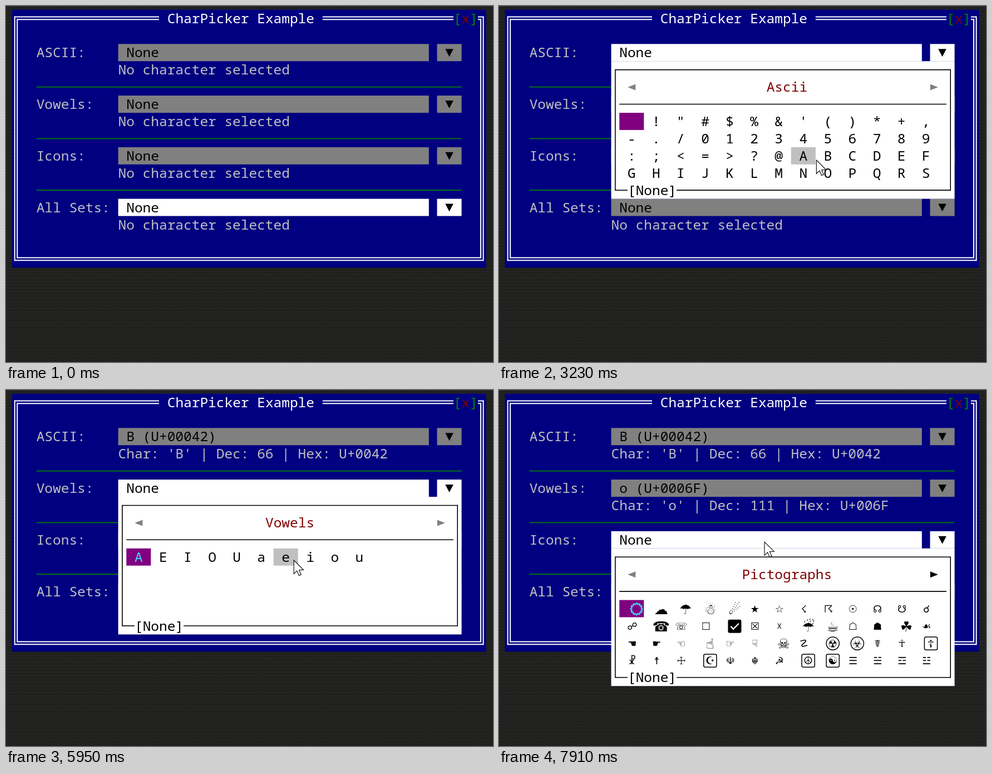
These frames come from a looping animation (875x640 px, 8000 ms). An HTML page with a canvas:

```html
<!DOCTYPE html>
<html lang="en">
<head>
<meta charset="utf-8">
<title>CharPicker Example</title>
<style>
  html, body { margin: 0; width: 100%; height: 100%; overflow: hidden; background: #000; }
  canvas { display: block; width: 875px; height: 640px; }
</style>
</head>
<body>
<canvas id="stage" width="875" height="640"></canvas>
<script>
const W = 875, H = 640, LOOP = 8000;
const CW = 14.69, CH = 30.93, X0 = 10.6, Y0 = 6.4;
const LAG = 70;
const NAVY = '#000080', SILVER = '#c0c0c0', GRAY = '#808080', GREEN = '#008000', MAROON = '#800000';
const MONO = `${CW / 0.6}px "Noto Sans Mono", "DejaVu Sans Mono", monospace`;
const ctx = document.getElementById('stage').getContext('2d');

const range = (start, n) => Array.from({ length: n }, (_, i) => String.fromCharCode(start + i));
const LABELS = ['ASCII:', 'Vowels:', 'Icons:', 'All Sets:'];
const ROWS = [2, 5, 8, 11];
const POPUPS = [
  { title: 'Ascii', col: 32, chars: range(32, 52) },
  { title: 'Vowels', col: 31, chars: [...'AEIOUaeiou'] },
  { title: 'Pictographs', col: 29, chars: range(0x2600, 52), icons: true, more: true }
];
const WIDE = '☀☁☂☃☄☎☑☔☕☘☝☠☢☣☦☪☮☯';
const BOXED = '☦☪☮☯', RINGED = '☢☣';

// Pointer moves: start, end, points evenly spaced in time
const MOVES = [
  [440, 1270, [[817, 690], [812, 500], [775, 280], [690, 110], [590, 35], [515, 48], [471.5, 84]]],
  [2530, 3370, [[471.5, 84], [466, 110], [462, 165], [472, 225], [510, 265], [570, 277], [598, 277]]],
  [3400, 3510, [[598, 277], [607, 271]]],
  [4170, 5010, [[607, 271], [600, 265], [560, 235], [500, 205], [455, 184], [440, 178]]],
  [5560, 6340, [[440, 178], [442, 185], [480, 275], [517, 306], [545, 307], [566, 307], [574, 307]]],
  [6970, 7380, [[574, 307], [560, 300], [510, 280], [477, 273]]]
];
const CLICKS = [[1410, 1540], [2000, 2070], [3710, 3840], [5210, 5410], [6560, 6690], [7780, 7910]];

const colX = c => X0 + c * CW;
const rowY = r => Y0 + r * CH;
const midY = r => rowY(r + 0.5);

function cells(col, row, w, h, color) {
  ctx.fillStyle = color;
  ctx.fillRect(colX(col), rowY(row), w * CW, h * CH);
}

function text(str, col, row, color) {
  ctx.font = MONO;
  ctx.textAlign = 'left';
  ctx.fillStyle = color;
  ctx.fillText(str, colX(col), midY(row) + 8.7);
}

function line(x1, y1, x2, y2, color, width) {
  ctx.strokeStyle = color;
  ctx.lineWidth = width;
  ctx.beginPath();
  ctx.moveTo(x1, y1);
  ctx.lineTo(x2, y2);
  ctx.stroke();
}

function shape(points, color) {
  ctx.fillStyle = color;
  ctx.beginPath();
  points.forEach(([x, y]) => ctx.lineTo(x, y));
  ctx.closePath();
  ctx.fill();
}

function makeBackdrop() {
  const c = document.createElement('canvas');
  c.width = W;
  c.height = H;
  const g = c.getContext('2d');
  g.fillStyle = '#000';
  g.fillRect(0, 0, W, H);
  g.fillStyle = '#8c8c84';
  const dx = CW / 6, dy = CH / 12;
  for (let j = 0; j * dy < H; j++)
    for (let x = (j % 2) * dx / 2; x < W; x += dx) g.fillRect(x, j * dy, 1.25, 1.2);
  return c;
}
const backdrop = makeBackdrop();

function drawWindow() {
  cells(0, 0, 58, 15, NAVY);
  const l = colX(0.5), r = colX(57.5), t = midY(0), b = midY(14);
  for (const d of [-2.3, 2.3]) {
    line(l + d, t + d - 1, l + d, b - d + 1, '#fff', 2);
    line(r - d, t + d - 1, r - d, b - d + 1, '#fff', 2);
    line(l + d, b - d, r - d, b - d, '#fff', 2);
    line(l + d, t + d, colX(18), t + d, '#fff', 2);
    line(colX(38), t + d, colX(54), t + d, '#fff', 2);
    line(colX(57), t + d, r - d, t + d, '#fff', 2);
  }
  text('CharPicker Example', 19, 0, '#fff');
  text('[', 54, 0, GREEN);
  text('x', 55, 0, MAROON);
  text(']', 56, 0, GREEN);
  for (const row of [4, 7, 10]) line(colX(3), midY(row), colX(55), midY(row), GREEN, 1.6);
}

function drawField(i, color, value, info) {
  const row = ROWS[i], x = colX(53.5), y = midY(row);
  text(LABELS[i], 3, row, SILVER);
  cells(13, row, 38, 1, color);
  cells(52, row, 3, 1, color);
  text(value, 14, row, '#000');
  shape([[x - 7.3, y - 6.5], [x + 7.3, y - 6.5], [x, y + 7.5]], '#000');
  text(info, 13, row + 1, SILVER);
}

function drawSun(x, y) {
  ctx.beginPath();
  for (let i = 0; i <= 96; i++) {
    const a = i / 96 * Math.PI * 2, r = 9.6 + 1.1 * Math.cos(a * 12);
    ctx.lineTo(x + r * Math.cos(a), y + r * Math.sin(a));
  }
  ctx.lineWidth = 2.2;
  ctx.stroke();
}

function drawIcon(ch, col, row, color) {
  const wide = WIDE.includes(ch);
  const x = colX(col) + (wide ? CW + 1.5 : CW / 2 + 1), y = midY(row) + 0.8;
  ctx.fillStyle = ctx.strokeStyle = color;
  if (ch === '☀') return drawSun(x, y);
  if (ch === '☑') {
    ctx.beginPath();
    ctx.roundRect(x - 12, y - 12, 24, 24, 3);
    ctx.fill();
    ctx.strokeStyle = '#fff';
    ctx.lineWidth = 2.4;
    ctx.beginPath();
    ctx.moveTo(x - 7, y);
    ctx.lineTo(x - 2.5, y + 5);
    ctx.lineTo(x + 7.5, y - 5);
    return ctx.stroke();
  }
  const boxed = BOXED.includes(ch), ringed = RINGED.includes(ch);
  if (boxed || ringed) {
    ctx.lineWidth = 1.5;
    ctx.beginPath();
    ctx.roundRect(x - 11.6, y - 11.6, 23.2, 23.2, ringed ? 11.6 : 3);
    ctx.stroke();
  }
  const size = boxed || ringed ? 19 : wide ? 25 : 18;
  ctx.font = `${size}px "DejaVu Sans", sans-serif`;
  ctx.textAlign = 'center';
  ctx.fillText(ch, x, y + size * 0.36);
}

function drawPopup(i, [px, py]) {
  const p = POPUPS[i], top = ROWS[i] + 1;
  cells(13, top, 42, 8, '#fff');
  const l = colX(13.5), r = colX(54.5), t = midY(top), b = midY(top + 7);
  line(l, t, r, t, '#000', 1.6);
  line(l, t - 0.8, l, b + 0.8, '#000', 1.6);
  line(r, t - 0.8, r, b + 0.8, '#000', 1.6);
  line(l, b, colX(15), b, '#000', 1.6);
  line(colX(21), b, r, b, '#000', 1.6);
  text('[None]', 15, top + 7, '#000');

  text(p.title, p.col, top + 1, MAROON);
  const ay = midY(top + 1) + 0.5, ax = colX(15.5), bx = colX(52.5);
  shape([[ax - 7, ay], [ax + 7, ay - 5.5], [ax + 7, ay + 5.5]], GRAY);
  shape([[bx + 7, ay], [bx - 7, ay - 5.5], [bx - 7, ay + 5.5]], p.more ? '#000' : GRAY);
  line(colX(14), midY(top + 2), colX(54), midY(top + 2), '#000', 1.6);

  const hoverCol = Math.floor((px - colX(14)) / (3 * CW));
  const hoverRow = Math.floor((py - rowY(top + 3)) / CH);
  p.chars.forEach((ch, k) => {
    const c = k % 13, rw = Math.floor(k / 13);
    const col = 14 + c * 3, row = top + 3 + rw;
    if (k === 0) cells(col, row, 3, 1, '#800080');
    else if (c === hoverCol && rw === hoverRow) cells(col, row, 3, 1, SILVER);
    const color = k === 0 ? '#40d8ff' : '#000';
    if (p.icons) drawIcon(ch, col + 1, row, color);
    else text(ch, col + 1, row, color);
  });
}

function spline(pts, u) {
  const n = pts.length - 1, s = u * n;
  const i = Math.min(n - 1, Math.floor(s)), f = s - i;
  const at = k => pts[Math.max(0, Math.min(n, k))];
  return [0, 1].map(d => {
    const [a, b, c, e] = [at(i - 1)[d], at(i)[d], at(i + 1)[d], at(i + 2)[d]];
    return b + f * (c - a + f * (2 * a - 5 * b + 4 * c - e + f * (3 * (b - c) + e - a))) / 2;
  });
}

function pointerAt(t) {
  let pos = [W, H + 60];
  for (const [t0, t1, pts] of MOVES)
    if (t >= t0) pos = spline(pts, Math.min(1, (t - t0) / (t1 - t0)));
  return pos;
}

function drawPointer([x, y]) {
  ctx.save();
  ctx.translate(x, y);
  ctx.beginPath();
  for (const [px, py] of [[0, 0], [0, 24.3], [5.5, 19], [9.2, 27.4], [13, 25.8], [9.4, 17.6], [17.2, 17.2]])
    ctx.lineTo(px, py);
  ctx.closePath();
  ctx.fillStyle = '#fff';
  ctx.fill();
  ctx.strokeStyle = '#000';
  ctx.lineWidth = 1.1;
  ctx.stroke();
  ctx.restore();
}

const info = (ch, dec, hex) => `Char: '${ch}' | Dec: ${dec} | Hex: U+${hex}`;

function draw(t) {
  const open = t >= 7780 ? 2 : t >= 5280 && t < 6560 ? 1 : t >= 2070 && t < 3710 ? 0 : -1;
  const focus = t < 2070 ? 3 : t < 5280 ? 0 : t < 7780 ? 1 : 2;
  const values = ['None', 'None', 'None', 'None'];
  const infos = values.map(() => 'No character selected');
  if (t >= 3710) { values[0] = 'B (U+00042)'; infos[0] = info('B', 66, '0042'); }
  if (t >= 6560) { values[1] = 'o (U+0006F)'; infos[1] = info('o', 111, '006F'); }

  const seen = pointerAt(t - LAG);
  const hoverRow = t >= 4240 && open < 0 ? Math.floor((seen[1] - Y0) / CH) : -1;

  ctx.drawImage(backdrop, 0, 0);
  drawWindow();
  LABELS.forEach((_, i) => {
    const color = i === focus ? '#fff' : ROWS[i] === hoverRow ? '#0ff' : GRAY;
    drawField(i, color, values[i], infos[i]);
  });
  if (open >= 0) drawPopup(open, seen);

  const pos = pointerAt(t);
  if (t >= 510) drawPointer(pos);
  if (CLICKS.some(([a, b]) => t >= a && t < b)) {
    ctx.fillStyle = 'rgba(255,255,0,0.5)';
    ctx.beginPath();
    ctx.arc(pos[0], pos[1], 23, 0, Math.PI * 2);
    ctx.fill();
  }
}

const start = performance.now();
function tick() {
  draw((performance.now() - start) % LOOP);
  requestAnimationFrame(tick);
}
tick();
</script>
</body>
</html>
```
